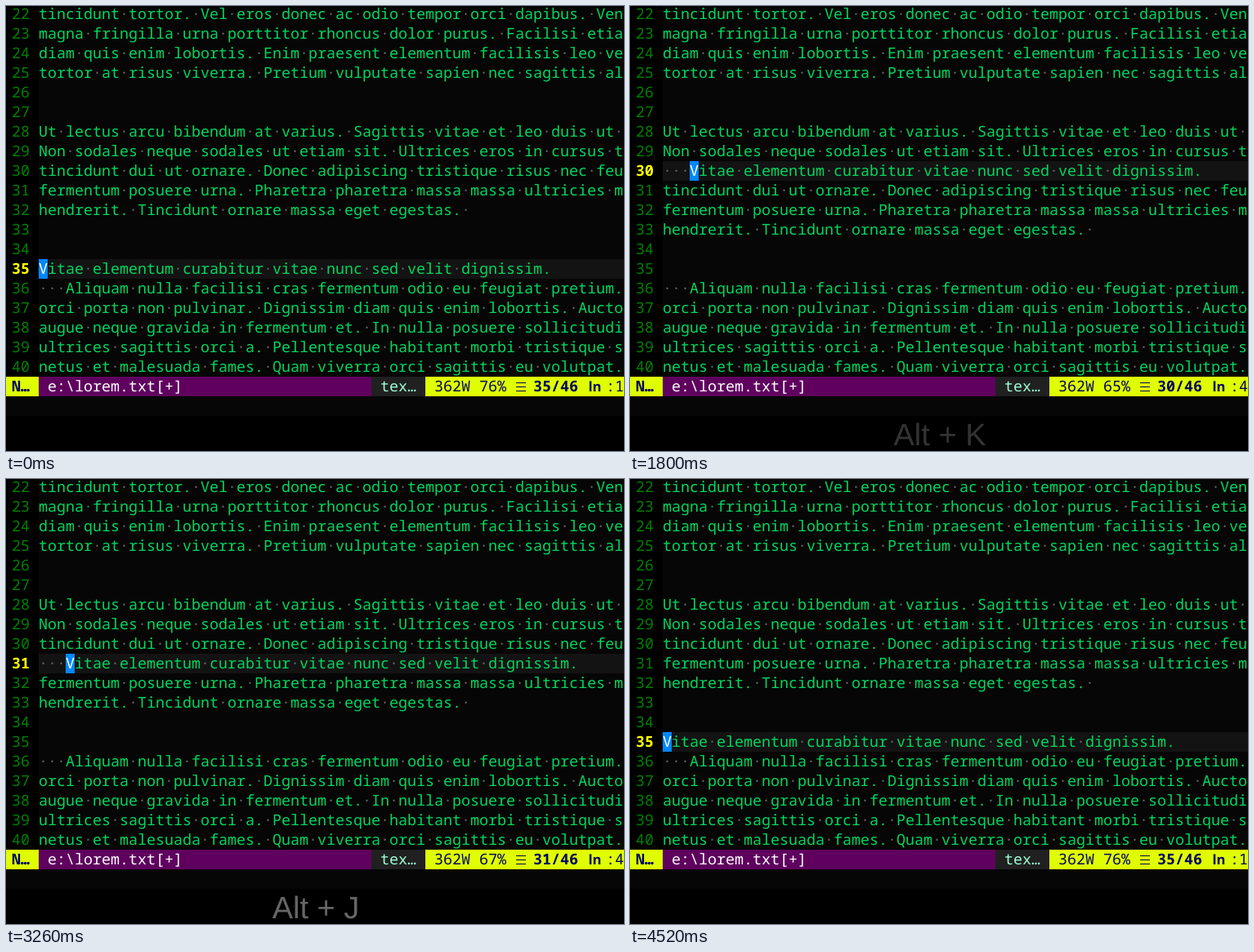
These frames come from a looping animation (756 px wide and 545 px high, 4600 ms). An HTML page:

```html
<!DOCTYPE html>
<html lang="en">
<head>
<meta charset="utf-8">
<title>Moving a line in a text editor</title>
<style>
  html, body { margin: 0; width: 100%; height: 100%; overflow: hidden; background: #060606; }
  svg { display: block; width: 756px; height: 545px; }
  text {
    font: 18.333px "Noto Sans Mono", "DejaVu Sans Mono", monospace;
    white-space: pre;
    text-rendering: geometricPrecision;
  }
  .code { fill: #00d75f; }
  .dot { fill: #626262; }
  .num { fill: #008000; }
  .num.current { fill: #ffff00; }
  .navy { fill: #00005f; }
  .bold, .num.current { font-weight: 700; }
  .key { font: 38px "Liberation Sans", Arial, sans-serif; fill: #fff; text-anchor: middle; }
</style>
</head>
<body>
<svg viewBox="0 0 756 545">
  <rect width="756" height="545" fill="#060606"/>
  <rect width="40" height="454" fill="#000"/>
  <rect id="cursorLine" x="40" width="716" height="24" fill="#131313"/>
  <rect id="cursor" width="11" height="24" fill="#0087ff"/>
  <g id="rows"></g>
  <g id="status">
    <rect y="454" width="40" height="24" fill="#dfff00"/>
    <rect x="40" y="454" width="407" height="24" fill="#5f005f"/>
    <rect x="447" y="454" width="66" height="24" fill="#202020"/>
    <rect x="513" y="454" width="243" height="24" fill="#dfff00"/>
    <text class="navy bold" x="7" y="472">N…</text>
    <text x="51" y="472" fill="#fff">e:\lorem.txt[+]</text>
    <text x="458" y="472" fill="#9cffd3">tex…</text>
    <text class="navy" id="percent" x="524" y="472"></text>
    <path d="M624 461.5h12M624 466.5h12M624 471.5h12" stroke="#00005f" stroke-width="1.2"/>
    <text class="navy bold" id="position" x="645" y="472"></text>
    <text class="navy bold" x="712.5" y="472" style="font-family:'Noto Sans',sans-serif;font-size:16.5px">ln</text>
    <text class="navy" id="column" x="734" y="472"></text>
  </g>
  <rect y="502" width="756" height="43" fill="#000"/>
  <text class="key" id="key" x="379" y="538"></text>
</svg>
<script>
const LOOP = 4600, FIRST = 22, TOTAL = 46, CELL = 11, ROW = 24, LEFT = 40;
const HOME = 35;
const MOVED = "Vitae elementum curabitur vitae nunc sed velit dignissim.";
const OTHERS = [
  "tincidunt tortor. Vel eros donec ac odio tempor orci dapibus. Ven",
  "magna fringilla urna porttitor rhoncus dolor purus. Facilisi etia",
  "diam quis enim lobortis. Enim praesent elementum facilisis leo ve",
  "tortor at risus viverra. Pretium vulputate sapien nec sagittis al",
  "",
  "",
  "Ut lectus arcu bibendum at varius. Sagittis vitae et leo duis ut ",
  "Non sodales neque sodales ut etiam sit. Ultrices eros in cursus t",
  "tincidunt dui ut ornare. Donec adipiscing tristique risus nec feu",
  "fermentum posuere urna. Pharetra pharetra massa massa ultricies m",
  "hendrerit. Tincidunt ornare massa eget egestas. ",
  "",
  "",
  "   Aliquam nulla facilisi cras fermentum odio eu feugiat pretium.",
  "orci porta non pulvinar. Dignissim diam quis enim lobortis. Aucto",
  "augue neque gravida in fermentum et. In nulla posuere sollicitudi",
  "ultrices sagittis orci a. Pellentesque habitant morbi tristique s",
  "netus et malesuada fames. Quam viverra orci sagittis eu volutpat."
];

// Press times per key: L and H shift the line sideways, K and J up and down.
const PRESSES = Object.entries({
  L: [60, 330, 600],
  K: [920, 1200, 1320, 1520, 1720, 1920, 2120, 2320],
  J: [2520, 2720, 2940, 3140, 3340, 3460, 3660, 3860],
  H: [4140, 4340, 4520]
}).flatMap(([key, times]) => times.map(at => ({ key, at })));
const SHIFT = { L: [1, 0], H: [-1, 0], K: [0, -1], J: [0, 1] };

// One upward move is caught before the cursor follows the line.
const LATE_CURSOR = { at: 1320, until: 1380 };

const el = id => document.getElementById(id);
const rowTop = line => (line - FIRST) * ROW - 2;
const dots = text => text.replace(/ /g, '<tspan class="dot">·</tspan>');

function codeMarkup(text, cursorCol) {
  if (cursorCol < 0) return dots(text);
  return dots(text.slice(0, cursorCol)) +
    `<tspan fill="#fff">${text[cursorCol]}</tspan>` + dots(text.slice(cursorCol + 1));
}

function stateAt(t) {
  const state = { indent: 0, line: HOME, key: "", alpha: 0 };
  for (const { key, at } of PRESSES) {
    if (at > t) break;
    state.indent += SHIFT[key][0];
    state.line += SHIFT[key][1];
    state.key = key;
    state.alpha = Math.min(3, Math.floor((t - at) / 60)) * 0.2;
  }
  if (t >= PRESSES.at(-1).at) state.alpha = 0;
  const late = t >= LATE_CURSOR.at && t < LATE_CURSOR.until;
  state.cursorRow = state.line + (late ? 1 : 0);
  return state;
}

let shown = "";
function render(t) {
  const { indent, line, cursorRow, key, alpha } = stateAt(t);
  el("key").textContent = key && "Alt + " + key;
  el("key").setAttribute("opacity", alpha);

  const signature = [indent, line, cursorRow].join();
  if (signature === shown) return;
  shown = signature;

  const lines = [...OTHERS];
  lines.splice(line - FIRST, 0, " ".repeat(indent) + MOVED);
  el("rows").innerHTML = lines.map((text, i) => {
    const n = FIRST + i, y = rowTop(n) + 18;
    return `<text class="num${n === line ? " current" : ""}" x="7" y="${y}">${n}</text>` +
      `<text class="code" x="${LEFT}" y="${y}">${codeMarkup(text, n === cursorRow ? indent : -1)}</text>`;
  }).join("");

  el("cursorLine").setAttribute("y", rowTop(line));
  el("cursor").setAttribute("x", LEFT + indent * CELL);
  el("cursor").setAttribute("y", rowTop(cursorRow));
  el("percent").textContent = `362W ${Math.floor(cursorRow * 100 / TOTAL)}%`;
  el("position").textContent = `${cursorRow}/${TOTAL}`;
  el("column").textContent = ":" + (indent + 1);
}

const start = performance.now();
function tick() {
  render((performance.now() - start) % LOOP);
  requestAnimationFrame(tick);
}
tick();
</script>
</body>
</html>
```
